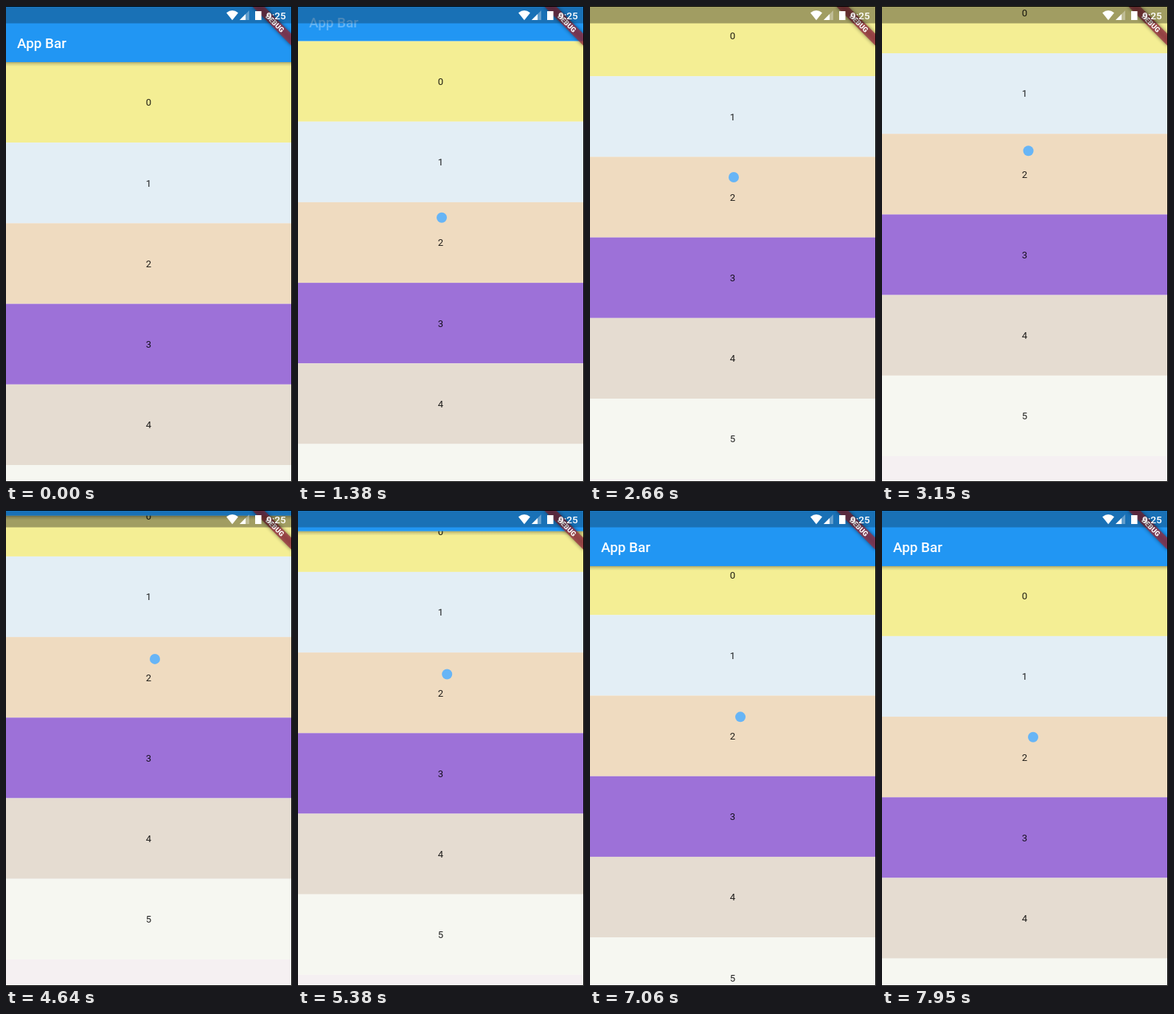
An HTML page for the animation above (7.99 s loop, 388 by 645 pixels).

```html
<!DOCTYPE html>
<html lang="en">
<head>
<meta charset="utf-8">
<title>Floating app bar</title>
<style>
  html, body { margin: 0; width: 100%; height: 100%; overflow: hidden; background: #fafafa; }
  svg { display: block; width: 388px; height: 645px; font-family: Roboto, sans-serif; }
</style>
</head>
<body>
<svg viewBox="0 0 388 645">
  <defs>
    <linearGradient id="fade" x2="0" y2="1">
      <stop offset="0" stop-opacity=".3"/>
      <stop offset=".4" stop-opacity=".13"/>
      <stop offset="1" stop-opacity="0"/>
    </linearGradient>
    <filter id="blur" x="-20%" y="-80%" width="140%" height="260%">
      <feGaussianBlur stdDeviation="2.6"/>
    </filter>
  </defs>

  <g id="list" font-size="13.2" text-anchor="middle"></g>

  <g id="bar">
    <rect id="shadow" y="76" width="388" height="6" fill="url(#fade)"/>
    <rect width="388" height="76" fill="#2196f3"/>
    <text id="title" x="15" y="57" font-size="18.9" font-weight="500" fill="#fff">App Bar</text>
  </g>

  <g transform="translate(387.5 .5) rotate(45) scale(.944)">
    <rect x="-40" y="28" width="80" height="12" opacity=".5" filter="url(#blur)"/>
    <rect x="-40" y="28" width="80" height="12" fill="#9b2d41" fill-opacity=".72"/>
    <text y="37.6" font-size="10.2" font-weight="900" fill="#fff" text-anchor="middle">DEBUG</text>
  </g>

  <rect id="tintBar" width="388" opacity=".25"/>
  <rect id="tintList" width="388" opacity=".34"/>

  <g fill="#fff">
    <path d="M299 9.2Q307 2.8 315 9.2L307 19.2Z"/>
    <path d="M330 6V19H317Z" opacity=".32"/>
    <path d="M325 11V19H317Z"/>
    <path d="M338 7H346.5V19H338Z"/>
    <text x="353" y="17.5" font-size="13.6" font-weight="500">9:25</text>
  </g>

  <circle id="dot" r="7" fill="#67b5f6"/>
  <path d="M0 .5H387.5V644.5H0" fill="none" stroke="#000"/>
</svg>
<script>
const LOOP = 7990, BAR = 76, STATUS = 23.5, ROW = 109.2, TOUCH = 980, TURN = 4520, MAX = 130;
const colors = ['#f4ee94', '#e3eef5', '#efdbc0', '#9d71d8', '#e5dcd1', '#f6f7f1', '#f5f0f2'];

// drags: start, end, scroll offset reached, slowing
const drags = [
  [TOUCH, 1740, 54, 0], [1890, 2660, 90, 0], [2700, 3350, MAX, .4],
  [TURN, 4970, 110, .6], [5180, 5940, 77, 0], [6020, 6800, 50, .8],
  [6850, 7450, 33, .3], [7590, 7950, 14.3, 0]
];

const $ = id => document.getElementById(id);
const clamp = (v, lo, hi) => Math.min(hi, Math.max(lo, v));
const ramp = (t, a, b) => clamp((t - a) / (b - a), 0, 1);
const set = (el, attrs) => {
  for (const k in attrs) el.setAttribute(k, attrs[k]);
};

$('list').innerHTML = colors.map((c, i) =>
  `<rect width="388" height="${ROW}" fill="${c}"/>` +
  `<text x="193.5" fill-opacity=".87">${i}</text>`).join('');
const rows = $('list').querySelectorAll('rect');
const labels = $('list').querySelectorAll('text');

// With a lag, gives the offset the finger is already asking for.
function offset(t, lag = 0) {
  let s = 0;
  for (const [a, b, to, slow] of drags) {
    const p = ramp(t + clamp(t - a, 0, lag), a, b);
    s += (to - s) * (p + slow * p * (1 - p));
    if (t < b) break;
  }
  return s;
}

// cubic-bezier(.4, 0, .2, 1)
function fastOutSlowIn(x) {
  let lo = 0, hi = 1;
  for (let n = 0; n < 16; n++) {
    const u = (lo + hi) / 2, v = 1 - u;
    if (1.2 * v * v * u + 0.6 * v * u * u + u * u * u < x) lo = u; else hi = u;
  }
  return lo * lo * (3 - 2 * lo);
}

function draw(t) {
  const scroll = offset(t), back = t >= TURN;
  const bottom = clamp((back ? MAX : BAR) - scroll, 0, BAR);
  const edge = Math.min(bottom, STATUS);

  rows.forEach((row, i) => {
    const y = BAR - scroll + i * ROW;
    set(row, { y });
    set(labels[i], { y: Math.round(y + 59.4) });
  });
  set($('bar'), { transform: `translate(0 ${bottom - BAR})` });
  set($('title'), { opacity: fastOutSlowIn(ramp(ramp(bottom, STATUS, BAR), .25, 1)) });
  set($('shadow'), { opacity: bottom === 0 ? 0 : back ? 1 : 1 - ramp(t, TOUCH, TOUCH + 200) });
  set($('tintBar'), { height: edge });
  set($('tintList'), { y: edge, height: STATUS - edge });
  set($('dot'), {
    cx: 195 + 5 * ramp(t, 2660, 3350) + 2 * ramp(t, 3950, 4080) + 3 * ramp(t, 5180, 7950),
    cy: 322 - offset(t, back ? 40 : 95),
    visibility: t < TOUCH ? 'hidden' : 'visible'
  });
}

const start = performance.now();
function tick() {
  draw((performance.now() - start) % LOOP);
  requestAnimationFrame(tick);
}
tick();
</script>
</body>
</html>
```
